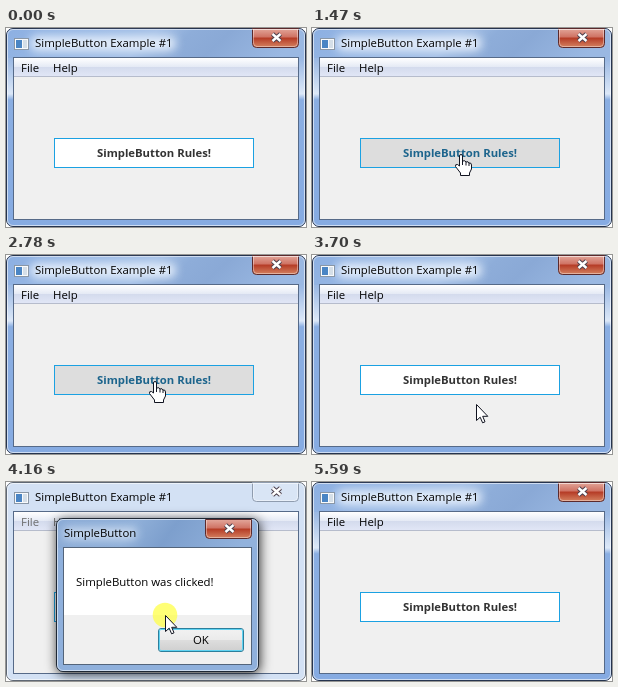
Recreate the animation shown at these times as an HTML page. Size 300 by 199 pixels, loop 5.89 s.

```html
<!DOCTYPE html>
<html lang="en">
<head>
<meta charset="utf-8">
<title>SimpleButton Example #1</title>
<style>
  html, body { margin: 0; height: 100%; overflow: hidden; background: #fff; }
  svg { display: block; width: 100%; height: 100%; }
  text { font: 11.4px "Open Sans", "Noto Sans", sans-serif; }
  #rules { font-weight: bold; font-size: 11.3px; text-anchor: middle; fill: #333; }
  #button { fill: #fff; stroke: #1ba1e2; }
  .hover #button { fill: #ddd; }
  .hover #rules { fill: #1c648c; }
  .press #button { fill: #c8c8c8; stroke: #137cab; }
  .inactive .active, #main:not(.inactive) .idle { display: none; }
  .inactive #menu { fill: #6d6d6d; }
  .glow { fill: #e3edfa; filter: blur(5px); }
  #shadow { filter: drop-shadow(1px 2px 6px #000c); }
  .hot #ok { fill: url(#okHot); stroke: #3c7fb1; }
</style>
</head>
<body>
<svg viewBox="0 0 300 199">
  <defs>
    <linearGradient id="side" x2="0" y2="1">
      <stop offset="0" stop-color="#86a9dd"/><stop offset=".16" stop-color="#9dbae4"/>
      <stop offset=".33" stop-color="#dce8f8"/><stop offset=".36" stop-color="#8aaee2"/>
      <stop offset="1" stop-color="#86abe2"/>
    </linearGradient>
    <linearGradient id="bar" x2="1" y2=".1">
      <stop offset="0" stop-color="#8db0e2"/><stop offset=".5" stop-color="#a3bfe6"/>
      <stop offset=".62" stop-color="#8eadd9"/><stop offset=".75" stop-color="#8aa9d6"/>
      <stop offset="1" stop-color="#9ab8e2"/>
    </linearGradient>
    <linearGradient id="dialogBar" x2="1" y2=".1">
      <stop offset="0" stop-color="#8babd6"/><stop offset=".4" stop-color="#8fafd8"/>
      <stop offset=".6" stop-color="#7d9fcd"/><stop offset="1" stop-color="#92b2dc"/>
    </linearGradient>
    <linearGradient id="menuBar" x2="0" y2="1">
      <stop offset="0" stop-color="#fff"/><stop offset=".48" stop-color="#e5eaf5"/>
      <stop offset=".52" stop-color="#d4dbed"/><stop offset="1" stop-color="#e1e6f6"/>
    </linearGradient>
    <linearGradient id="red" x2="0" y2="1">
      <stop offset="0" stop-color="#e3a79b"/><stop offset=".45" stop-color="#cf7263"/>
      <stop offset=".5" stop-color="#b53b25"/><stop offset="1" stop-color="#d58362"/>
    </linearGradient>
    <linearGradient id="okFill" x2="0" y2="1">
      <stop offset="0" stop-color="#f2f2f2"/><stop offset=".48" stop-color="#ebebeb"/>
      <stop offset=".52" stop-color="#ddd"/><stop offset="1" stop-color="#cfcfcf"/>
    </linearGradient>
    <linearGradient id="okHot" x2="0" y2="1">
      <stop offset="0" stop-color="#eaf6fd"/><stop offset=".48" stop-color="#d9f0fc"/>
      <stop offset=".52" stop-color="#bee6fd"/><stop offset="1" stop-color="#a7d9f5"/>
    </linearGradient>
    <path id="cross" d="M-4-3.5 4 3.5M4-3.5-4 3.5"/>
    <g id="close">
      <path d="M.5.5V15.5Q.5 19.5 4.5 19.5H42.5Q46.5 19.5 46.5 15.5V.5Z"/>
      <path d="M1.5 1V15Q1.5 18.5 5 18.5H42Q45.5 18.5 45.5 15V1" fill="none" stroke="#fff" opacity=".4"/>
      <g transform="translate(24.5 9.5)">
        <use href="#cross" stroke="#4b3f4c" stroke-width="4.4"/>
        <use href="#cross" stroke="#fff" stroke-width="2.4"/>
      </g>
    </g>
  </defs>

  <g id="main">
    <g class="active">
      <rect x=".5" y=".5" width="299" height="198" rx="6.5" fill="url(#side)" stroke="#26344e"/>
      <path d="M2 30V7Q2 2 7 2H293Q298 2 298 7V30Z" fill="url(#bar)"/>
      <rect class="glow" x="24" y="8" width="146" height="15" rx="7"/>
      <use href="#close" x="246" fill="url(#red)" stroke="#5b2a2c"/>
    </g>
    <g class="idle">
      <rect x=".5" y=".5" width="299" height="198" rx="6.5" fill="#d3e1f4" stroke="#5f6874"/>
      <use href="#close" x="246" fill="#d9e5f5" stroke="#8f9cae"/>
    </g>
    <rect x="1.5" y="1.5" width="297" height="196" rx="5.5" fill="none" stroke="#fff" opacity=".6"/>
    <rect x="8.5" y="10.5" width="14" height="11" fill="#f8fafc" stroke="#8a97a6"/>
    <path d="M10 12H16V20H10Z" fill="#4a85c4"/>
    <path d="M17 12H21V20H17Z" fill="#d5dfe8"/>
    <text x="29" y="19">SimpleButton Example #1</text>
    <rect x="7.5" y="29.5" width="285" height="162" fill="#f0f0f0" stroke="#566a88"/>
    <path d="M8 30H292V48H8Z" fill="url(#menuBar)"/>
    <path d="M8 48.5H292" stroke="#b6bccc"/>
    <g id="menu"><text x="15" y="44">File</text><text x="47" y="44">Help</text></g>
    <rect id="button" x="48.5" y="110.5" width="199" height="29"/>
    <text id="rules" x="148" y="129">SimpleButton Rules!</text>
  </g>

  <g id="dialog">
    <rect id="shadow" x="50.5" y="36.5" width="202" height="153" rx="6.5" fill="#8fb0dc" stroke="#1f2834"/>
    <path d="M52 66V43Q52 38 57 38H246Q251 38 251 43V66Z" fill="url(#dialogBar)"/>
    <rect class="glow" x="57" y="46" width="74" height="11" rx="5" opacity=".75"/>
    <rect x="51.5" y="37.5" width="200" height="151" rx="5.5" fill="none" stroke="#fff" opacity=".55"/>
    <use href="#close" x="199" y="37" fill="url(#red)" stroke="#5b2a2c"/>
    <text x="58" y="55">SimpleButton</text>
    <rect x="57.5" y="65.5" width="188" height="117" fill="#fff" stroke="#53647a"/>
    <path d="M58 133H245V182H58Z" fill="#f0f0f0"/>
    <text x="70" y="104">SimpleButton was clicked!</text>
    <rect id="ok" x="152.5" y="146.5" width="85" height="23" rx="2.5" fill="url(#okFill)" stroke="#2c7f9c"/>
    <rect x="153.5" y="147.5" width="83" height="21" rx="1.5" fill="none" stroke="#5fd3f2"/>
    <text x="187" y="162">OK</text>
  </g>

  <g id="cursor">
    <circle id="click" r="12.3" fill="#ffff3c" opacity=".7"/>
    <path id="arrow" d="M.5.5V16.5L4.2 13.2 6.6 18.8 9 17.8 6.7 12.3H11.8Z" fill="#fff" stroke="#10131f"/>
    <g id="hand">
      <path d="M-1.5 12V2Q-1.5 .5 0 .5T1.5 2V7Q4.5 6 5 8 7.5 7 8 9 10.5 8.5 10.5 11V15L8.5 19V21.5H-.5V19L-5.5 12.5Q-6 10-3.5 10.5Z" fill="#fff" stroke="#10131f"/>
      <path d="M1.5 7V11M5 8V11.5M8 9V12" stroke="#10131f"/>
    </g>
  </g>
</svg>
<script>
const LOOP = 5890, TICK = 78;
const $ = id => document.getElementById(id);
const show = (id, on) => $(id).style.display = on ? "" : "none";

// start, end, steps, from x, y, to x, y, easing power
const moves = [
  [1010, 1470, 7, 167, 199, 149, 126, 1],
  [1900, 2240, 6, 149, 126, 144, 177, 1.5],
  [2470, 2780, 5, 144, 177, 149, 126, 1],
  [3160, 3470, 5, 149, 126, 172, 177, 1],
  [3620, 4010, 6, 172, 177, 159, 133, .41],
  [4560, 4890, 5, 159, 133, 162, 148, 1],
  [5540, 5540, 1, 162, 148, 170, 174, 1]
];

function pointer(t) {
  const move = moves.findLast(m => t >= m[0]);
  if (!move || t >= 5590) return null;
  const [, end, n, x0, y0, x1, y1, power] = move;
  const step = Math.max(1, n + Math.min(0, Math.floor((t - end) / TICK)));
  const p = (step / n) ** power;
  return [Math.round(x0 + (x1 - x0) * p), Math.round(y0 + (y1 - y0) * p)];
}

function draw(t) {
  const at = pointer(t);
  const open = t >= 4160 && t < 5270, closing = t >= 5180;
  const hover = !!at && t < 4160 && at[1] >= 110 && at[1] < 140;
  const press = t >= 4010 && t < 4160;

  $("main").classList.toggle("hover", hover);
  $("main").classList.toggle("press", press);
  $("main").classList.toggle("inactive", open && !closing);
  show("dialog", open);
  $("dialog").style.opacity = closing ? .45 : 1;
  $("dialog").classList.toggle("hot", open && at[1] >= 147);

  show("cursor", at);
  if (at) $("cursor").setAttribute("transform", `translate(${at})`);
  show("hand", hover);
  show("arrow", !hover);
  show("click", (t >= 4010 && t < 4560) || (t >= 5090 && t < 5270));
}

function frame() {
  draw(performance.now() % LOOP);
  requestAnimationFrame(frame);
}
frame();
</script>
</body>
</html>
```
